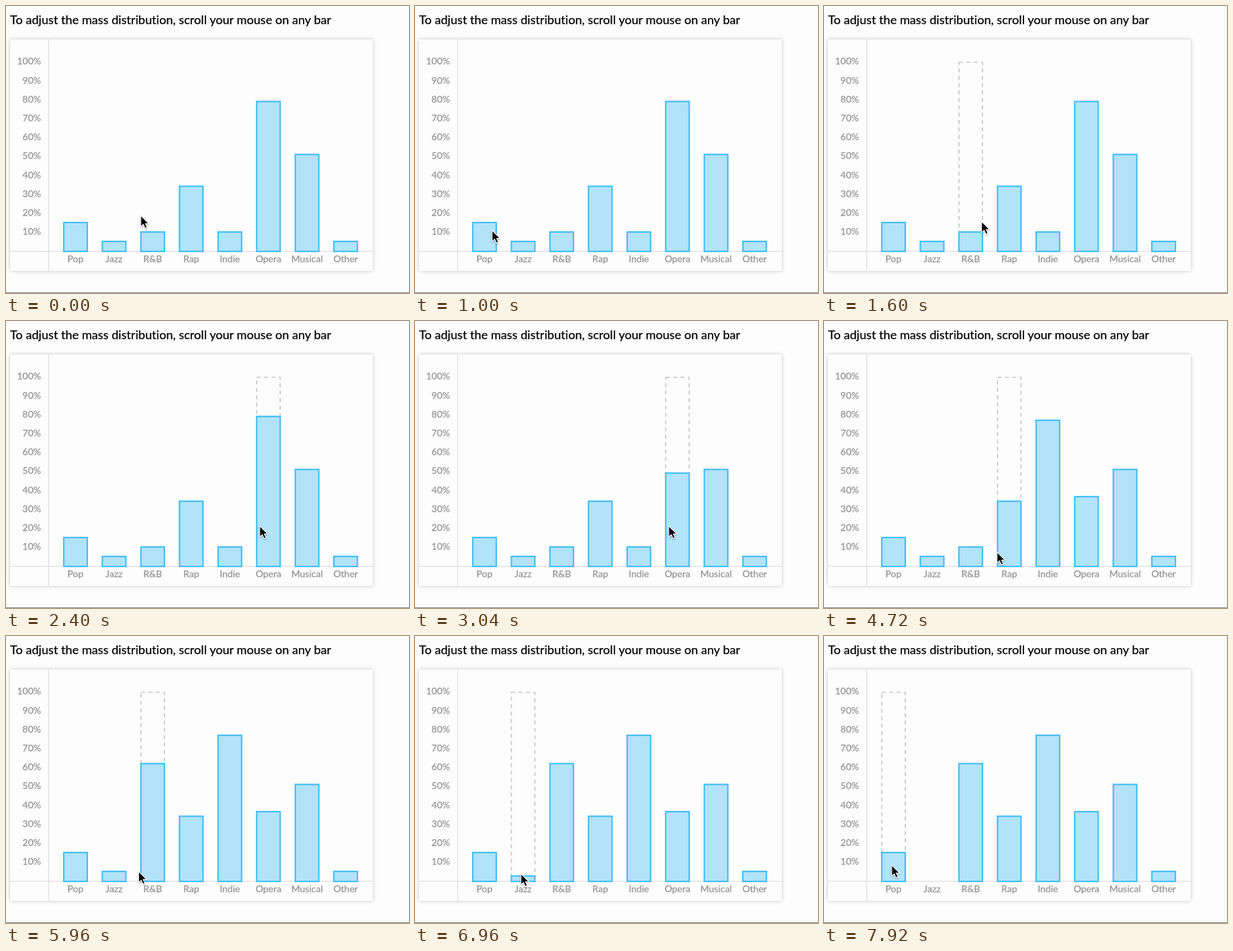
Write an HTML page that moves like this. It is 600 px wide and 428 px high and loops after 8 s.

```html
<!DOCTYPE html>
<html lang="en">
<head>
<meta charset="utf-8">
<title>Mass distribution</title>
<style>
  html, body { margin: 0; width: 100%; height: 100%; overflow: hidden; background: #fefdfe; }
  svg { position: absolute; left: 0; top: 0; width: 600px; height: 428px;
    font-family: Lato, sans-serif; font-variant-ligatures: none; }
  .card { position: absolute; left: 6px; top: 50px; width: 540px; height: 345px;
    background: #fefdfe; box-shadow: 0 0 6px rgba(0, 0, 0, .22); }
  .title { font-size: 18.15px; fill: #000; stroke: #000; stroke-width: .25; }
  .label { font-size: 14px; fill: #929292; stroke: #929292; stroke-width: .25; }
  .axis { stroke: #dedede; stroke-width: 1.2; }
  .bar { fill: #b1e3fa; stroke: #45bff4; stroke-width: 2.2; }
  .limit { fill: none; stroke: #c6c6c6; stroke-width: 1.7; stroke-dasharray: 6 5; }
  .cursor { filter: drop-shadow(0 1px 1px rgba(0, 0, 0, .35)); }
</style>
</head>
<body>
<div class="card"></div>
<svg id="stage" viewBox="0 0 600 428"></svg>
<script>
const LOOP = 8000, BASE = 366, FULL = 84, WIDTH = 35, HOVER_LAG = 100;
const stage = document.getElementById('stage');

const levels = { Pop: 15, Jazz: 5, 'R&B': 10, Rap: 34.2, Indie: 10, Opera: 79, Musical: 51, Other: 5 };
const names = Object.keys(levels);

// Where the cursor rests; a level is what it scrolls that bar to meanwhile.
const stops = [
  { x: 201, y: 312, from: 0, to: 0 },
  { x: 115, y: 334, from: 1000, to: 1200 },
  { x: 378, y: 305, from: 2080, to: 2400 },
  { x: 378, y: 305, from: 2400, to: 3400, bar: 'Opera', level: 36.6 },
  { x: 337, y: 312, from: 3620, to: 4260, bar: 'Indie', level: 77 },
  { x: 258, y: 344, from: 4720, to: 4720 },
  { x: 205, y: 350, from: 5000, to: 5880, bar: 'R&B', level: 62 },
  { x: 158, y: 354, from: 6400, to: 7560, bar: 'Jazz', level: 0 },
  { x: 101, y: 341, from: 7920, to: LOOP }
];

const clamp = u => Math.min(1, Math.max(0, u));
const smooth = u => u * u * (3 - 2 * u);
const mix = (a, b, u) => a + (b - a) * u;
const barX = index => 86 + index * 57.45;
const topOf = level => 365.2 - level * 2.82;

function cursorAt(time) {
  const next = stops.findIndex(stop => stop.from > time);
  if (next < 0) return stops[stops.length - 1];
  const a = stops[next - 1], b = stops[next];
  const u = clamp((time - a.to) / (b.from - a.to));
  return { x: mix(a.x, b.x, u), y: mix(a.y, b.y, u) };
}

function levelAt(name, time) {
  const stop = stops.find(s => s.bar === name);
  if (!stop) return levels[name];
  return mix(levels[name], stop.level, smooth(clamp((time - stop.from) / (stop.to - stop.from))));
}

function add(tag, attrs, text) {
  const node = document.createElementNS('http://www.w3.org/2000/svg', tag);
  for (const key in attrs) node.setAttribute(key, attrs[key]);
  if (text) node.textContent = text;
  return stage.appendChild(node);
}

add('text', { class: 'title', x: 6, y: 27 }, 'To adjust the mass distribution, scroll your mouse on any bar');
add('path', { class: 'axis', d: 'M63.5 50V395M6 365.8H546' });
add('path', { d: 'M0 427.5H600', stroke: '#858585' });
for (let i = 1; i <= 10; i++) {
  add('text', { class: 'label', x: 52, y: 369.3 - i * 28.2, 'text-anchor': 'end' }, i * 10 + '%');
}

const limit = add('rect', { class: 'limit', y: FULL, width: WIDTH });
const rects = names.map((name, i) => {
  add('text', { class: 'label', x: barX(i) + WIDTH / 2, y: 382.3, 'text-anchor': 'middle' }, name);
  return add('rect', { class: 'bar', x: barX(i), width: WIDTH });
});
const cursor = add('path', {
  class: 'cursor', d: 'M.5 .5V17L4.3 13.6L6.9 19.4L9.8 18.1L7.3 12.5H12.4Z',
  fill: '#000', stroke: '#fff', 'stroke-width': 1.1
});

function draw(time) {
  const { x, y } = cursorAt(time);
  cursor.setAttribute('transform', `translate(${x - .7} ${y})`);

  const hoverX = cursorAt(Math.max(0, time - HOVER_LAG)).x;
  limit.style.display = 'none';
  names.forEach((name, i) => {
    const level = levelAt(name, time), top = topOf(level), left = barX(i);
    rects[i].setAttribute('y', top);
    rects[i].setAttribute('height', BASE - top);
    rects[i].style.display = level > .5 ? '' : 'none';
    if (hoverX > left + 1 && hoverX < left + WIDTH) {
      limit.style.display = '';
      limit.setAttribute('x', left);
      limit.setAttribute('height', top - FULL);
    }
  });
}

const start = performance.now();
function tick() {
  draw((performance.now() - start) % LOOP);
  requestAnimationFrame(tick);
}
tick();
</script>
</body>
</html>
```
